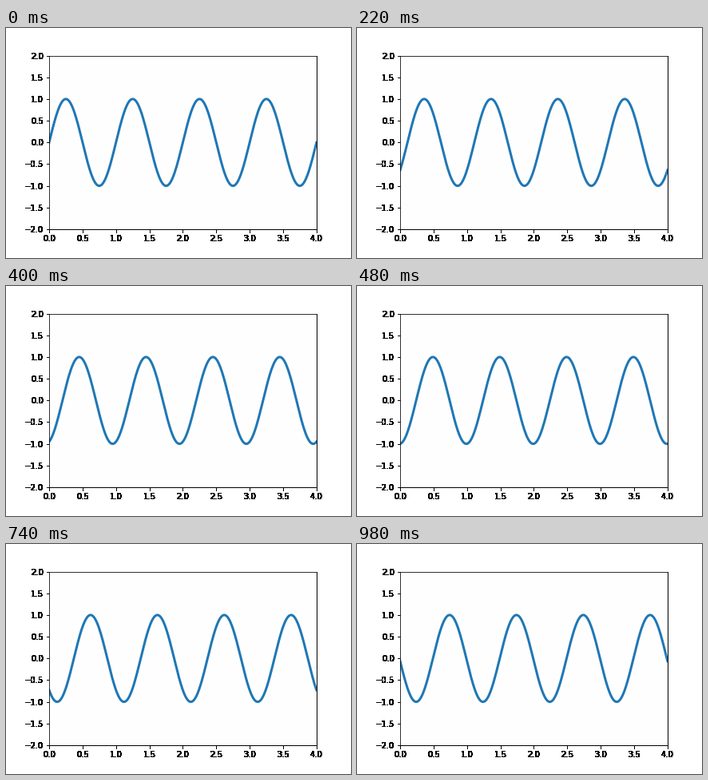
A matplotlib script that plays this animation: 432 px wide and 288 px high, repeating every 1 s.

```python
import numpy as np
import matplotlib.pyplot as plt
from matplotlib.animation import FuncAnimation

FRAMES = 50
INTERVAL = 20
SHIFT_PER_FRAME = 0.01

plt.rcParams.update({"font.family": "DejaVu Sans", "font.size": 10})


def solid_ink(fig):
    """Return the half-transparent marks outside the plot as solid black."""
    fig.canvas.draw()
    alpha = np.asarray(fig.canvas.buffer_rgba())[..., 3]
    ink = np.zeros(alpha.shape + (4,), dtype=np.uint8)
    ink[..., 3] = np.where((alpha > 0) & (alpha < 255), 255, 0)
    return ink


fig = plt.figure(figsize=(6, 4), dpi=72, facecolor=(1, 1, 1, 0))
fig.subplots_adjust(left=0.125, right=0.9, bottom=0.125, top=0.88)
ax = fig.add_subplot(xlim=(0, 4), ylim=(-2, 2), facecolor="#fefefe")

# Labels, ticks and outer spines are hard-edged, without antialiasing.
fig.figimage(solid_ink(fig), origin="upper", zorder=10)
fig.set_facecolor("white")

x = np.linspace(0, 4, 1000)
line, = ax.plot([], [], color="#1f77b4", lw=3)


def update(frame):
    line.set_data(x, np.sin(2 * np.pi * (x - SHIFT_PER_FRAME * frame)))
    return line,


anim = FuncAnimation(fig, update, frames=FRAMES, interval=INTERVAL,
                     repeat=True, repeat_delay=0)
plt.show()
```
